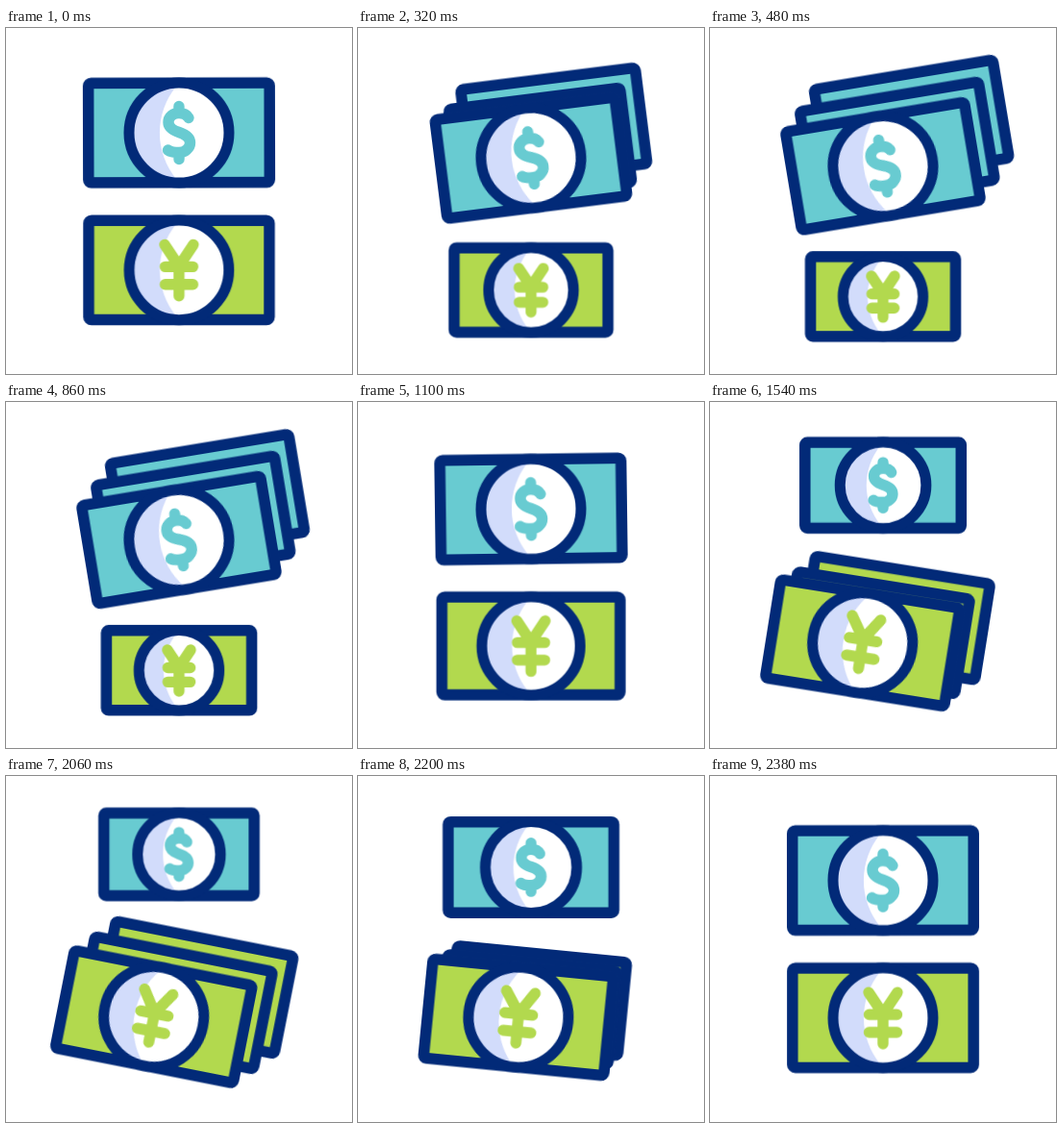
An HTML page for the animation above (2.4 s loop, 360 by 360 pixels).

```html
<!DOCTYPE html>
<html lang="en">
<head>
<meta charset="utf-8">
<title>Banknotes</title>
<style>
  html, body { margin: 0; width: 100%; height: 100%; overflow: hidden; background: #fff; }
  svg { display: block; width: 100%; height: 100%; }

  .dollar { --fill: #68cbd1; --x: 0px; --y: 35.3px; --turn: -9.5deg; --away: -27.3px; --small: .828; --fan: -40ms; --rest: -1240ms; }
  .yen { --fill: #b2d94e; --x: -26.5px; --y: -1px; --turn: 11.3deg; --away: 28px; --small: .8; --fan: -1240ms; --rest: -40ms; }

  .fan, .shrink, .mid, .back {
    animation: fan 2400ms cubic-bezier(.37, 0, .63, 1) var(--fan) infinite;
  }
  .shrink { animation-name: shrink; animation-delay: var(--rest); }
  .mid { animation-name: mid; }
  .back { animation-name: back; }

  /* 540 ms out, hold, 320 ms back; the other stack takes the second half */
  @keyframes fan {
    0%, 50%, 100% { transform: translate(0px, 0px) rotate(0deg); }
    22.5%, 36.67% { transform: translate(var(--x), var(--y)) rotate(var(--turn)); }
  }
  @keyframes shrink {
    0%, 50%, 100% { transform: translate(0px, 0px) scale(1); }
    22.5%, 36.67% { transform: translate(0px, var(--away)) scale(var(--small)); }
  }
  @keyframes mid {
    0%, 5.2%, 50%, 100% { transform: translate(0px, 0px) scale(.88); }
    22.5%, 36.67% { transform: translate(18.2px, -18.6px) scale(1); }
  }
  @keyframes back {
    0%, 50%, 100% { transform: translate(0px, 0px) scale(.88); }
    22.5%, 36.67% { transform: translate(36.6px, -38.7px) scale(1); }
  }

  /* Line weights stay constant while the stacks change size */
  .note, .ring, .sign { vector-effect: non-scaling-stroke; }
  .note { fill: var(--fill); stroke: #022a78; stroke-width: 11.5; }
  .ring { fill: none; stroke: #022a78; stroke-width: 11; }
  .sign { fill: none; stroke: var(--fill); stroke-width: 11.4; stroke-linecap: round; stroke-linejoin: round; }
</style>
</head>
<body>
<svg viewBox="0 0 360 360">
  <defs>
    <rect id="note" class="note" x="-94.25" y="-51.75" width="188.5" height="103.5" rx="3"/>
    <g id="seal">
      <circle r="50" fill="#fff"/>
      <path d="M-3-48A48 48 0 0 0-3 48A76 76 0 0 1-3-48Z" fill="#d2dcfb"/>
      <circle class="ring" r="52"/>
    </g>
  </defs>

  <g class="dollar" transform="translate(180 108.5)">
    <g class="shrink"><g class="fan">
      <use class="back" href="#note"/>
      <use class="mid" href="#note"/>
      <use href="#note"/>
      <use href="#seal"/>
      <path class="sign" d="M10-15.5C8-19 4-20.5 0-20.5C-6-20.5-11-16.5-11-11S-6-2.5 0-.5S11.5 5 11.5 10.5S6 20.5 0 20.5C-5 20.5-9 20-11.5 18M0-27.5V-21M0 21V27.5"/>
    </g></g>
  </g>

  <g class="yen" transform="translate(180 251.5)">
    <g class="shrink"><g class="fan">
      <use class="back" href="#note"/>
      <use class="mid" href="#note"/>
      <use href="#note"/>
      <use href="#seal"/>
      <path class="sign" d="M-15-26.5L0-4L15-26.5M0-4V27M-14.5-3.5H14.5M-14.5 15H14.5"/>
    </g></g>
  </g>
</svg>
</body>
</html>
```
